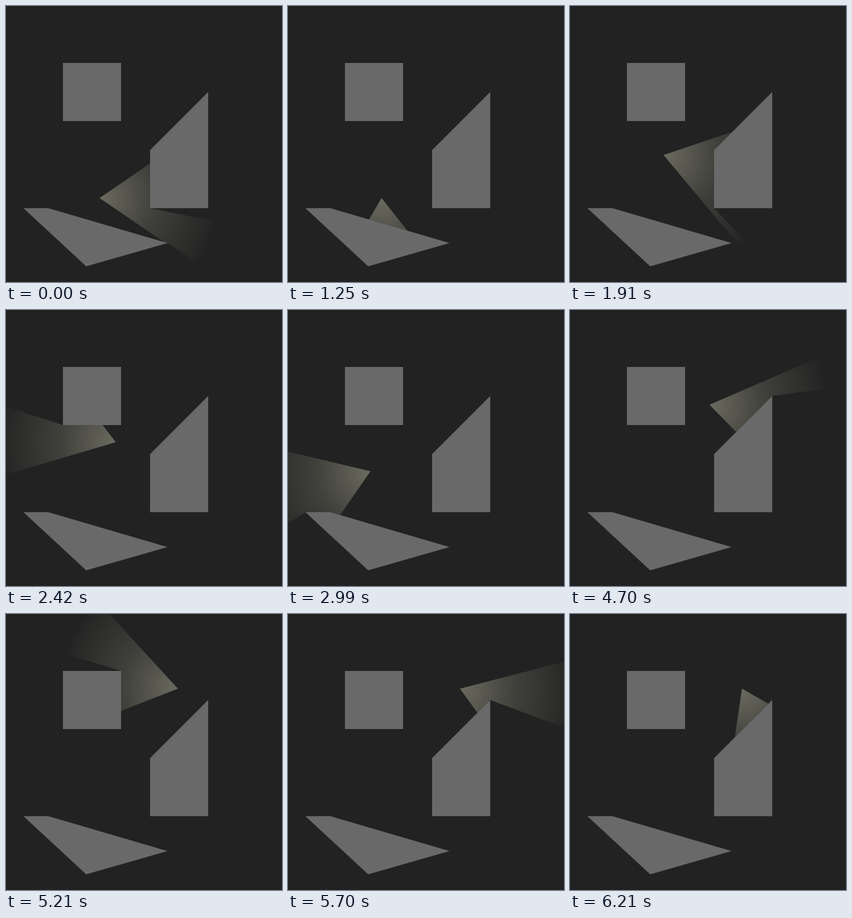
Recreate the animation shown at these times as an HTML page. Size 475 by 475 pixels, loop 6.6 s.

```html
<!DOCTYPE html>
<html lang="en">
<head>
<meta charset="utf-8">
<title>Flashlight and shadows</title>
<style>
  html, body { margin: 0; width: 100%; height: 100%; overflow: hidden; background: #222; }
  svg { display: block; width: 100%; height: 100%; }
</style>
</head>
<body>
<svg viewBox="0 0 475 475">
  <defs>
    <radialGradient id="glow" gradientUnits="userSpaceOnUse" cx="0" cy="0" r="200">
      <stop offset="0" stop-color="#ffffdc" stop-opacity=".33"/>
      <stop offset=".5" stop-color="#ffffdc" stop-opacity=".13"/>
      <stop offset="1" stop-color="#ffffdc" stop-opacity=".01"/>
    </radialGradient>
  </defs>
  <rect width="475" height="475" fill="#222"/>
  <path id="light" fill="url(#glow)"/>
  <g id="walls" fill="#696969"></g>
</svg>
<script>
const LOOP = 6600, STEP = 30, REACH = 200, HALF = 0.6;
const SPEED = 2 / 17; // pixels per ms while a direction is held
const shapes = [
  [[98, 98], [198, 98], [198, 198], [98, 198]],
  [[248, 248], [348, 148], [348, 348], [248, 348]],
  [[30, 348], [73, 348], [278, 408], [138, 448]]
];

// Where the light points: [time, degrees].
const turns = [[1050, 0], [1250, 86], [1700, 26], [1910, 15.7], [2390, -160],
  [2990, -201], [3830, -270], [4400, -352], [4700, -349]];

const light = document.getElementById('light');
const walls = document.getElementById('walls');
const edges = [];
for (const pts of shapes) {
  const poly = document.createElementNS('http://www.w3.org/2000/svg', 'polygon');
  poly.setAttribute('points', pts.join(' '));
  walls.append(poly);
  pts.forEach((p, i) => edges.push([p, pts[(i + 1) % pts.length]]));
}

const ramp = (t, from, to) => Math.min(1, Math.max(0, (t - from) / (to - from)));
const held = (t, from, to) => SPEED * (to - from) * ramp(t, from, to);

function position(t) {
  const right = held(t, 1920, 2158) + held(t, 3200, 3693) + held(t, 4360, 5176);
  const left = held(t, 2440, 2840);
  const up = held(t, 1281, 2157) + held(t, 3728, 4994);
  const down = held(t, 2430, 2855);
  return [161 + right - left, 330.5 + down - up];
}

function direction(t) {
  let deg = turns[0][1];
  for (let i = 1; i < turns.length; i++) {
    const [t0, d0] = turns[i - 1], [t1, d1] = turns[i];
    deg += (d1 - d0) * ramp(t, t0, t1);
  }
  if (t > 4950) deg -= 178; // the light passes the pointer and flips
  deg += 231 * Math.sin(ramp(t, 5210, 6010) * Math.PI / 2);
  return deg * Math.PI / 180;
}

// The point, relative to the light, where a ray ends.
function cast(x, y, angle) {
  const dx = Math.cos(angle), dy = Math.sin(angle);
  let best = REACH;
  for (const [a, b] of edges) {
    const ex = b[0] - a[0], ey = b[1] - a[1];
    const det = dx * ey - dy * ex;
    if (Math.abs(det) < 1e-9) continue;
    const px = a[0] - x, py = a[1] - y;
    const dist = (px * ey - py * ex) / det;
    const along = (px * dy - py * dx) / det;
    if (dist > 0 && dist < best && along >= 0 && along <= 1) best = dist;
  }
  return [dx * best, dy * best];
}

function draw(time) {
  const t = Math.floor((time - 20) / STEP) * STEP + 20;
  const [x, y] = position(t);
  const aim = direction(t);

  const offsets = [];
  for (let i = 0; i <= 100; i++) offsets.push(HALF * (i / 50 - 1));
  // Rays just beside each corner keep the shadow edges sharp.
  for (const [cx, cy] of shapes.flat()) {
    const d = Math.atan2(cy - y, cx - x) - aim;
    const off = Math.atan2(Math.sin(d), Math.cos(d));
    for (const o of [off - 1e-4, off + 1e-4]) {
      if (Math.abs(o) < HALF) offsets.push(o);
    }
  }
  offsets.sort((a, b) => a - b);

  const rim = offsets.map(o => cast(x, y, aim + o).map(n => n.toFixed(2)).join(' '));
  light.setAttribute('d', 'M0 0L' + rim.join('L') + 'Z');
  light.setAttribute('transform', `translate(${x} ${y})`);
}

const start = performance.now();
function tick() {
  draw((performance.now() - start) % LOOP);
  requestAnimationFrame(tick);
}
tick();
</script>
</body>
</html>
```
